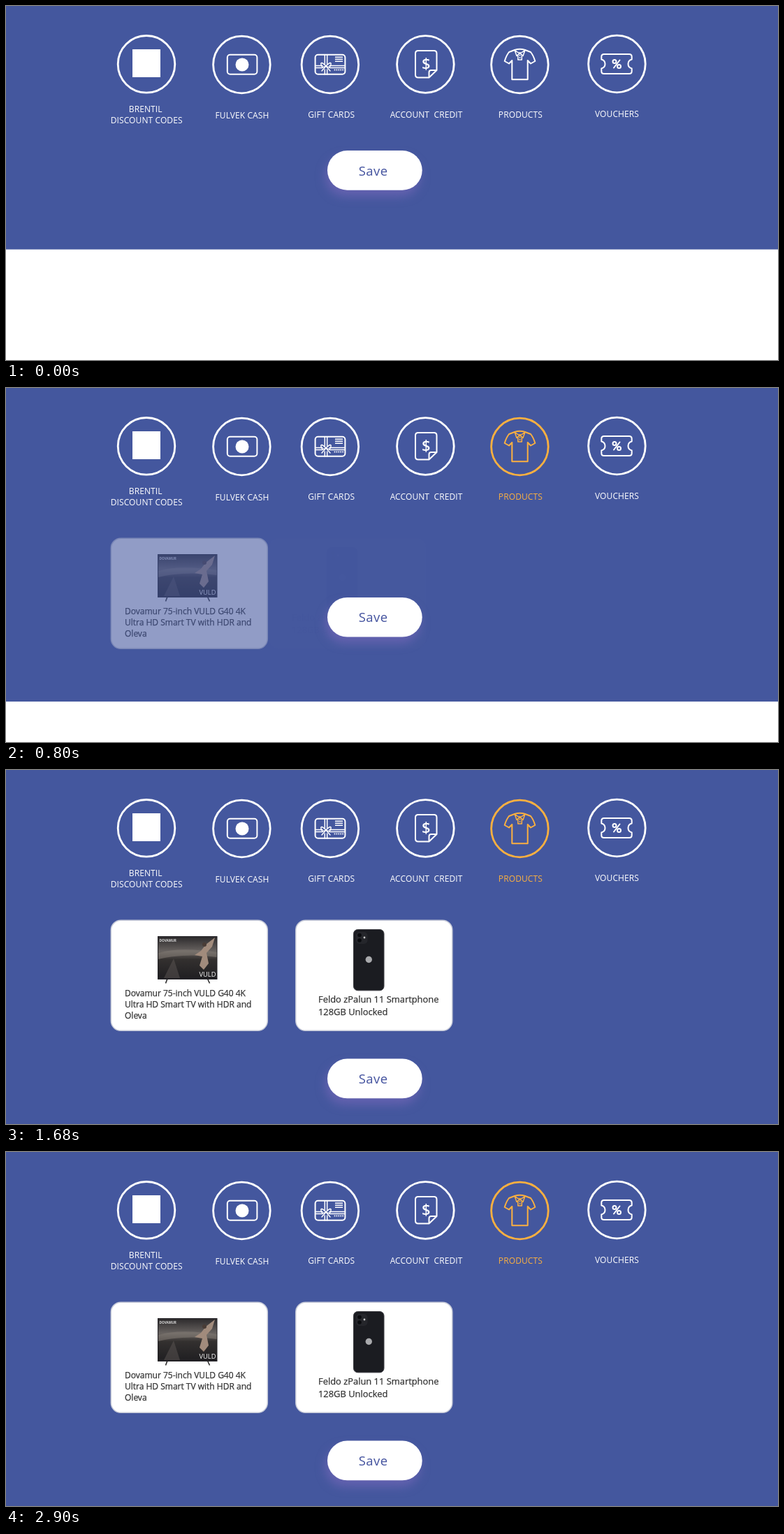
Write an HTML page that moves like this. It is 1105 px wide and 507 px high and loops after 2.92 s.

```html
<!DOCTYPE html>
<html lang="en">
<head>
<meta charset="utf-8">
<title>Reward picker</title>
<style>
  html, body { margin: 0; width: 100%; height: 100%; overflow: hidden; background: #44579e; }
  svg { display: block; width: 1105px; height: 507px; font-family: "Open Sans", "Noto Sans", sans-serif; }
  .icon { fill: none; stroke: currentColor; stroke-width: 2; stroke-linejoin: round; stroke-linecap: round; color: #fff; }
  .icon > circle:first-child { stroke-width: 2.8; }
  .solid { fill: currentColor; stroke: none; }
  .thin { stroke-width: 1.5; }
  .icon text { fill: currentColor; stroke: none; font-size: 12px; letter-spacing: .1px; text-anchor: middle; white-space: pre; }
  .icon .dollar { font-size: 22px; font-weight: 600; }
  .card > rect:first-child { fill: #fff; stroke: #c6cad8; stroke-width: 1.5; }
  .card .name { fill: #333; stroke: #333; stroke-width: .25; font-size: 12px; }
  #save { filter: drop-shadow(-3px 9px 7px rgba(125, 106, 190, .55)); }
</style>
</head>
<body>
<svg viewBox="0 0 1105 507">
  <defs>
    <linearGradient id="arena" x1="0" y1="0" x2="0" y2="1">
      <stop offset="0" stop-color="#2d2b2d"/>
      <stop offset=".35" stop-color="#686360"/>
      <stop offset=".55" stop-color="#33302f"/>
      <stop offset="1" stop-color="#201f22"/>
    </linearGradient>
  </defs>

  <g class="icon">
    <circle cx="201" cy="83.3" r="40.8"/>
    <rect class="solid" x="181" y="62" width="40" height="40"/>
    <text x="199.7" y="151.5">BRENTIL</text>
    <text x="201.2" y="167.5">DISCOUNT CODES</text>
  </g>

  <g class="icon">
    <circle cx="337.4" cy="84" r="40.8"/>
    <rect x="316.8" y="69.8" width="42.6" height="28" rx="4"/>
    <circle class="solid" cx="338" cy="84" r="9.5"/>
    <text x="338" y="161">FULVEK CASH</text>
  </g>

  <g class="icon">
    <circle cx="463.9" cy="84" r="40.8"/>
    <rect x="442.6" y="69.8" width="42.8" height="28" rx="4"/>
    <path class="thin" d="M456.3 70V83M459.7 70V83M456.3 91V98M459.7 91V98M443 85.5H453M443 88.5H453M463 85.5H485M463 88.5H485"/>
    <path class="thin" d="M458 86Q450 78 451 84T458 86Q466 78 465 84T458 86L452 93M458 86L464 93"/>
    <path class="thin" stroke-linecap="butt" d="M471 73.3H482M471 76.3H482M471 79.3H482"/>
    <path stroke-dasharray="0 2.9" d="M470.5 91.5H482.5"/>
    <text x="465.7" y="160">GIFT CARDS</text>
  </g>

  <g class="icon">
    <circle cx="600.4" cy="83.5" r="40.8"/>
    <path d="M605.5 102.5H590Q586 102.5 586 98.500V68Q586 64 590 64H612.500Q616.500 64 616.500 68V92L605.500 102.500V95Q605.500 92 608.500 92H616.500"/>
    <text class="dollar" x="601.3" y="89.500">$</text>
    <text x="601.6" y="159.500">ACCOUNT&#160; CREDIT</text>
  </g>

  <g class="icon" id="products">
    <circle cx="735.4" cy="84" r="40.8"/>
    <path d="M728 63L720 66Q716 71 713.7 79L720 82.500L724.300 78V105.300H746.700V78L751 82.500L757.300 79Q755 71 751 66L743 63Q735.500 60.500 728 63"/>
    <path class="thin" d="M728 63L731 71.500L735.500 67L740 71.500L743 63M729 64Q735.500 70 742 64M732.800 70V77H738.300V70"/>
    <path stroke-dasharray="0 3.500" d="M735.500 70.500V75"/>
    <text x="736.4" y="159.700">PRODUCTS</text>
  </g>

  <g class="icon">
    <circle cx="874.4" cy="83" r="40.8"/>
    <path d="M856 69H892Q895.700 69 895.700 72.500V76.500Q890.500 78 890.500 83T895.700 89.500V93.500Q895.700 97 892 97H856Q852.300 97 852.300 93.500V89.500Q857.500 88 857.500 83T852.300 76.500V72.500Q852.300 69 856 69Z"/>
    <path d="M878.500 77.500L870 88.500"/>
    <circle cx="871" cy="79.600" r="2.500"/>
    <circle cx="877.500" cy="86.600" r="2.500"/>
    <text x="874.5" y="159">VOUCHERS</text>
  </g>

  <rect id="page" width="1105" height="507" fill="#fff"/>

  <g class="card" id="tv">
    <rect x="150.300" y="215.300" width="224" height="158" rx="14"/>
    <path d="M231 299L228.500 305.500M288.500 299L291.500 305.500" stroke="#333" stroke-width="1.700"/>
    <rect x="217" y="238" width="85.500" height="62" fill="#222125"/>
    <rect x="218" y="239" width="83.500" height="59" fill="url(#arena)"/>
    <path d="M218 262Q250 253 301.500 261V268Q255 262 218 271Z" fill="#847c76" opacity=".55"/>
    <path d="M226 298L240 270L249 298Z" fill="#5b5654" opacity=".5"/>
    <path d="M299 240L295 253L287 262L290 277L283 286L277 280L281 267L270 265L279 259L286 250Z" fill="#a18b7c"/>
    <circle cx="284" cy="250" r="3" fill="#493c36"/>
    <text x="219.500" y="245.500" font-size="4.700" font-weight="700" fill="#ddd">DOVAMUR</text>
    <text x="276.500" y="295.500" font-size="9.300" fill="#fff">VULD</text>
    <g class="name">
      <text x="170" y="324">Dovamur 75-inch VULD G40 4K</text>
      <text x="170" y="340">Ultra HD Smart TV with HDR and</text>
      <text x="170" y="356.300">Oleva</text>
    </g>
  </g>

  <g class="card" id="phone">
    <rect x="414.800" y="215.300" width="224" height="158" rx="14"/>
    <rect x="497.500" y="228.500" width="43.500" height="87.300" rx="6" fill="#1b1c21" stroke="#3a3b40"/>
    <rect x="501" y="232" width="16.500" height="17" rx="5" fill="#25262b"/>
    <circle cx="506" cy="236.500" r="2.800" fill="#090a0d"/>
    <circle cx="506" cy="244" r="2.800" fill="#090a0d"/>
    <circle cx="513" cy="240" r="1.400" fill="#c9c9c9"/>
    <circle cx="519.300" cy="271.500" r="4.700" fill="#a9aaad"/>
    <g class="name" style="font-size:12.900px">
      <text x="447" y="333.300">Feldo zPalun 11 Smartphone</text>
      <text x="447" y="350.800">128GB Unlocked</text>
    </g>
  </g>

  <g id="save">
    <rect x="460" y="0" width="135.700" height="56.700" rx="28.350" fill="#fff"/>
    <text x="504.800" y="35.500" font-size="18.500" letter-spacing=".4" fill="#44539f">Save</text>
  </g>
</svg>
<script>
const LOOP = 2920;
const [products, page, tv, phone, save] =
  ["products", "page", "tv", "phone", "save"].map(id => document.getElementById(id));

const ramp = (t, from, to) => Math.min(1, Math.max(0, (t - from) / (to - from)));
const sine = p => (1 - Math.cos(Math.PI * p)) / 2;
const mix = (a, b, p) => a + (b - a) * p;
const move = (el, x, y) => el.setAttribute("transform", `translate(${x} ${y})`);

// Bottom edge of the blue panel: [time, y]
const edge = [[0, 348.5], [580, 421], [980, 470.5], [1300, 500.5], [1620, 513]];

function slope(i) {
  if (i === edge.length - 1) return 0;
  const [t0, y0] = edge[Math.max(0, i - 1)], [t1, y1] = edge[i + 1];
  return (y1 - y0) / (t1 - t0);
}

// Cubic Hermite curve through the points
function edgeAt(t) {
  const i = edge.findIndex(p => p[0] > t) - 1;
  if (i < 0) return edge.at(-1)[1];
  const [t0, y0] = edge[i], [t1, y1] = edge[i + 1];
  const d = t1 - t0, p = (t - t0) / d, q = 1 - p;
  return y0 * q * q * (1 + 2 * p) + y1 * p * p * (1 + 2 * q)
    + d * p * q * (slope(i) * q - slope(i + 1) * p);
}

function draw() {
  const t = performance.now() % LOOP;
  const tint = ramp(t, 0, 600), slide = ramp(t, 800, 1260);
  const rgb = [251, 176, 64].map(c => Math.round(mix(255, c, tint)));
  products.style.color = `rgb(${rgb})`;
  move(page, 0, edgeAt(t));
  tv.style.opacity = ramp(t, 620, 1060);
  phone.style.opacity = slide;
  move(phone, mix(-38, 0, slide), 0);
  move(save, 0, mix(207, 413.6, sine(ramp(t, 85, 1615))));
  requestAnimationFrame(draw);
}
draw();
</script>
</body>
</html>
```
